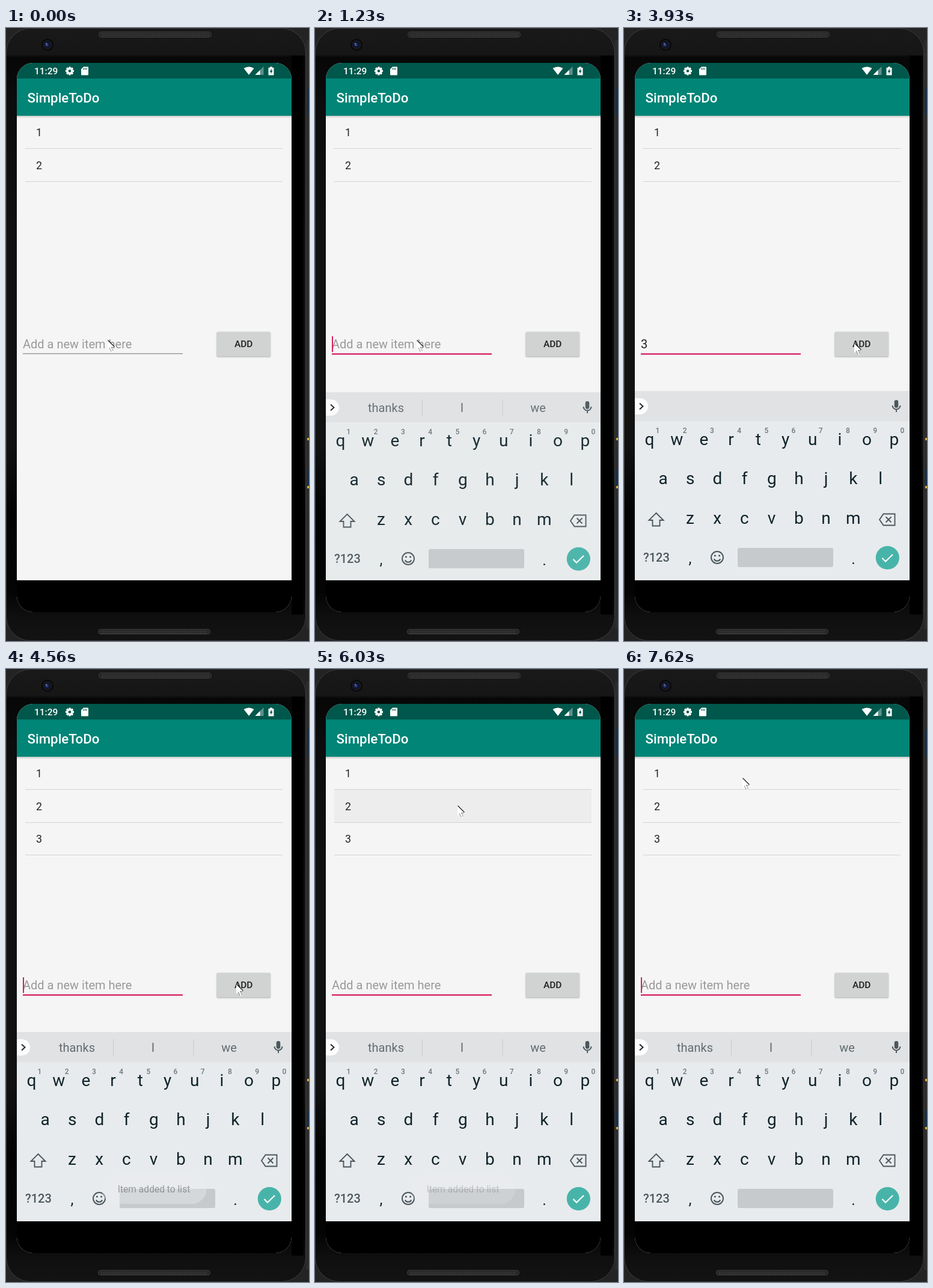
Recreate the animation shown at these times as an HTML page with a canvas. Size 504 by 1020 pixels, loop 8 s.

```html
<!DOCTYPE html>
<html lang="en">
<head>
<meta charset="utf-8">
<title>To-do list</title>
<style>
html, body { margin: 0; width: 100%; height: 100%; overflow: hidden; background: #111; }
canvas { display: block; }
</style>
</head>
<body>
<canvas id="stage" width="504" height="1020"></canvas>
<script>
const ctx = document.getElementById('stage').getContext('2d');
const LOOP = 8000;
const ACCENT = '#d81b60', INK = '#0f232a', ICON = '#4b575d';

// Value of the last [time, value] step that has started
function step(t, steps) {
  let value = steps[0][1];
  for (const [time, v] of steps) if (t >= time) value = v;
  return value;
}

const POINTER = [[0, [169, 519]], [3080, [196, 520]], [3200, [262, 521]], [3320, [324, 523]],
  [3440, [366, 524]], [3560, [383, 524]], [4700, [354, 420]], [4830, [293, 287]],
  [4980, [264, 250]], [5110, [245, 233]], [5230, [237, 227]], [6690, [222, 210]],
  [6820, [205, 193]], [6970, [199, 181]], [7370, [197, 181]]];
const CARET = [[0, 0], [920, 1], [1370, 0], [1870, 1], [2400, 0], [2550, 1], [2930, 0], [3440, 1],
  [3930, 0], [4320, 1], [4830, 0], [5230, 1], [5760, 0], [7620, 1]];
const FOCUS = [[0, 0], [800, 0.6], [920, 1]];
const TOAST = [[0, 0], [4560, 0.4], [4700, 0.8], [4830, 1], [5900, 0.6], [6020, 0.2], [6150, 0]];
const PRESS = [[0, 0], [5900, 0.35], [6020, 0.75], [6150, 1], [6270, 0]];

function rect(x, y, w, h, color) {
  ctx.fillStyle = color;
  ctx.fillRect(x, y, w, h);
}
function round(x, y, w, h, r, color) {
  ctx.beginPath();
  ctx.roundRect(x, y, w, h, r);
  ctx.fillStyle = color;
  ctx.fill();
}
function disc(x, y, r, color) {
  ctx.beginPath();
  ctx.arc(x, y, r, 0, Math.PI * 2);
  ctx.fillStyle = color;
  ctx.fill();
}
function text(str, x, y, size, color, align = 'left', weight = 400) {
  ctx.font = `${weight} ${size}px Roboto, sans-serif`;
  ctx.textAlign = align;
  ctx.fillStyle = color;
  ctx.fillText(str, x, y);
}
// SVG path drawn around (x, y)
function shape(d, x, y, fill, stroke, width = 2) {
  const path = new Path2D(d);
  ctx.save();
  ctx.translate(x, y);
  if (fill) { ctx.fillStyle = fill; ctx.fill(path, 'evenodd'); }
  if (stroke) { ctx.strokeStyle = stroke; ctx.lineWidth = width; ctx.stroke(path); }
  ctx.restore();
}

function speaker(x, y, w, h) {
  round(x, y, w, h, h / 2, '#3c3c3c');
  round(x + 1, y + 1, w - 2, h - 2, h / 2, '#262626');
  for (let i = x + 5; i < x + w - 5; i += 3)
    for (let j = y + 3; j < y + h - 2; j += 3) rect(i, j, 1.5, 1.5, '#474747');
}

function phone() {
  rect(0, 0, 504, 1020, '#232323');
  rect(499, 20, 5, 980, '#2c2c2c');
  rect(501, 100, 3, 44, '#12304c');
  rect(501, 735, 3, 28, '#12304c');
  rect(501, 682, 3, 4, '#d3ac3b');
  rect(501, 762, 3, 4, '#d3ac3b');
  const body = ctx.createLinearGradient(0, 0, 0, 1020);
  [[0, '#191919'], [0.043, '#161616'], [0.048, '#070707'], [0.12, '#0c0c0c'], [0.35, '#111111'],
    [0.68, '#111111'], [0.79, '#030303'], [0.92, '#040404'], [0.96, '#0f0f0f'],
    [1, '#131313']].forEach(s => body.addColorStop(...s));
  round(0.5, 0.5, 498, 1019, 40, body);
  ctx.strokeStyle = '#3e3e3e';
  ctx.lineWidth = 1;
  ctx.stroke();
  rect(475, 46, 20, 930, '#000');
  speaker(154, 6, 188, 10);
  speaker(153, 1000, 187, 9);
  disc(69, 28, 10, '#08080b');
  disc(69, 28, 8, '#17181e');
  disc(69, 28, 5, '#10152f');
  disc(68, 28, 2.5, '#2e3f85');
  disc(67, 26, 1, '#8c95c0');
}

function statusBar() {
  rect(18, 58, 457, 26, '#00574b');
  text('11:29', 47, 77, 15.5, '#fff', 'left', 500);
  for (let i = 0; i < 4; i++) {
    ctx.save();
    ctx.translate(106, 71.5);
    ctx.rotate(i * Math.PI / 4);
    rect(-1.7, -7, 3.4, 14, '#fff');
    ctx.restore();
  }
  disc(106, 71.5, 5.3, '#fff');
  disc(106, 71.5, 2.3, '#00574b');
  shape('M-2-7H5Q6-7 6-6V6Q6 7 5 7H-5Q-6 7-6 6V-3Z', 131, 71.5, '#fff');
  for (const x of [128.5, 131, 133.5]) rect(x, 66.5, 1.2, 3, '#00574b');
  shape('M0 7L-8.5-4Q0-9 8.5-4Z', 404, 71, '#fff');
  shape('M7-7V7H-7Z', 421.5, 71, '#5c9089');
  shape('M1-1V7H-7Z', 421.5, 71, '#fff');
  shape('M-2-7H2V-5.5H4.5V7H-4.5V-5.5H-2ZM1-4L-2.5 1.5H-.5V5L2.5-.5H.8Z', 441, 71.5, '#fff');
}

function list(t) {
  const press = step(t, PRESS);
  if (press) rect(32, 201, 428, 54, `rgba(0,0,0,${0.042 * press})`);
  const count = t >= 4320 ? 3 : 2;
  for (let i = 0; i < count; i++) {
    const y = 180 + i * 54.5;
    text(String(i + 1), 50, y, 17.8, '#222');
    rect(32, Math.round(y + 20), 428, 1, '#d3d3d3');
  }
}

function form(t) {
  const typed = t >= 2550 && t < 4320;
  if (typed) text('3', 28, 533, 20, '#222');
  else text('Add a new item here', 28, 533, 20, '#999');
  const focus = step(t, FOCUS);
  if (focus < 1) rect(28, 541.3, 266, 1.2, '#858585');
  ctx.globalAlpha = focus;
  rect(28, 541.3, 266, 2.3, ACCENT);
  ctx.globalAlpha = 1;
  if (step(t, CARET)) rect(typed ? 38 : 28, 513, 2, 26, ACCENT);

  const down = t >= 4200 && t < 4560;
  ctx.save();
  ctx.shadowColor = 'rgba(0,0,0,.3)';
  ctx.shadowBlur = down ? 5 : 2;
  ctx.shadowOffsetY = down ? 2 : 1;
  round(350.5, 505.5, 89.5, 41, 2, down ? '#c4c6c7' : '#d1d3d3');
  ctx.restore();
  text('ADD', 395.2, 531, 15.5, '#1f1f1f', 'center', 500);
}

function suggestions(t) {
  rect(18, 604, 457, 50, '#e0e2e4');
  if (t < 2550 || t >= 4320) {
    text('thanks', 118, 637, 20, '#626c71', 'center');
    text('I', 244.5, 637, 20, '#626c71', 'center');
    text('we', 371, 637, 20, '#626c71', 'center');
    rect(178, 616, 1, 27, '#c6cacc');
    rect(311.5, 616, 1, 27, '#c6cacc');
  }
  round(5, 616, 35, 27, 13.5, '#fdfdfd');
  shape('M-3-5L2.5 0L-3 5', 29, 629.5, null, '#222d32', 2);
  round(449.7, 619, 6.6, 13, 3.3, ICON);
  shape('M-6.5-1A6.5 6.5 0 0 0 6.5-1M0 5.5V10', 453, 629, null, ICON, 1.9);
}

function keys() {
  const row = (chars, x, y, gap) =>
    [...chars].forEach((c, i) => text(c, x + i * gap, y, 28, INK, 'center'));
  row('qwertyuiop', 42.5, 694, 45.2);
  row('asdfghjkl', 65, 759, 45.2);
  row('zxcvbnm', 110, 825, 45.2);
  [...'1234567890'].forEach((c, i) =>
    text(c, 56 + i * 45.2, 674, 12, '#6c767b', 'center', 500));
  shape('M0-11L12 1H6V10.5H-6V1H-12Z', 53.5, 818, null, ICON, 1.9);
  shape('M-13 0L-6.5-9.5H12.5V9.5H-6.5ZM-2.5-4.5L6.5 4.5M6.5-4.5L-2.5 4.5', 438, 818, null, ICON, 1.9);
  text('?123', 32, 888, 20, ICON, 'left', 500);
  text(',', 110, 891, 25, INK, 'center');
  text('.', 381.5, 892, 25, INK, 'center');
  shape('M10 0A10 10 0 1 1-10 0A10 10 0 1 1 10 0M-5.2 2.5A5.7 5.7 0 0 0 5.2 2.5', 155, 881, null, ICON, 2);
  disc(151.4, 878, 1.6, ICON);
  disc(158.6, 878, 1.6, ICON);
  round(189, 865, 159, 32, 3, '#c6cacd');
  disc(438.3, 881.5, 19.6, '#48b4a9');
  shape('M-8.5 0L-3 5.8L9-6', 438, 882, null, '#fff', 2.2);
}

function keyboard(t) {
  if (t < 1230) return;
  ctx.save();
  if (t < 1370) {
    ctx.translate(0, 2);
    ctx.globalAlpha = 0.95;
  }
  rect(18, 604, 457, 315, '#e8ebed');
  suggestions(t);
  keys();
  ctx.restore();
}

function toast(t) {
  const alpha = step(t, TOAST);
  if (!alpha) return;
  ctx.globalAlpha = alpha;
  round(159, 841, 174.5, 49, 24.5, '#e9ebed');
  text('Item added to list', 246, 871, 15.6, '#222', 'center');
  ctx.globalAlpha = 1;
}

function pointer(t) {
  const [x, y] = step(t, POINTER);
  shape('M0 0V16.5L3.8 13L7 20L9.5 19L6.6 12H12Z', x, y, '#fff');
  shape('M.5 .5L11.5 11.5', x, y, null, '#111', 1.1);
  ctx.setLineDash([1.2, 1.2]);
  shape('M3.5 13.5L6.5 20M6.8 12.5L9.5 19M6.5 12.5H11', x, y, null, '#333', 1);
  ctx.setLineDash([]);
}

function draw(t) {
  phone();
  ctx.save();
  ctx.beginPath();
  ctx.roundRect(18, 58, 457, 914, 27);
  ctx.clip();
  rect(18, 58, 457, 914, '#f5f5f5');
  statusBar();
  const shade = ctx.createLinearGradient(0, 146, 0, 150);
  shade.addColorStop(0, 'rgba(0,0,0,.2)');
  shade.addColorStop(1, 'rgba(0,0,0,0)');
  rect(18, 146, 457, 4, shade);
  rect(18, 84, 457, 62, '#008577');
  text('SimpleToDo', 35.5, 124, 22.3, '#fff', 'left', 500);
  list(t);
  form(t);
  keyboard(t);
  toast(t);
  rect(18, 919, 457, 53, '#000');
  ctx.restore();
  pointer(t);
}

const start = performance.now();
function tick() {
  draw((performance.now() - start) % LOOP);
  requestAnimationFrame(tick);
}
tick();
</script>
</body>
</html>
```
